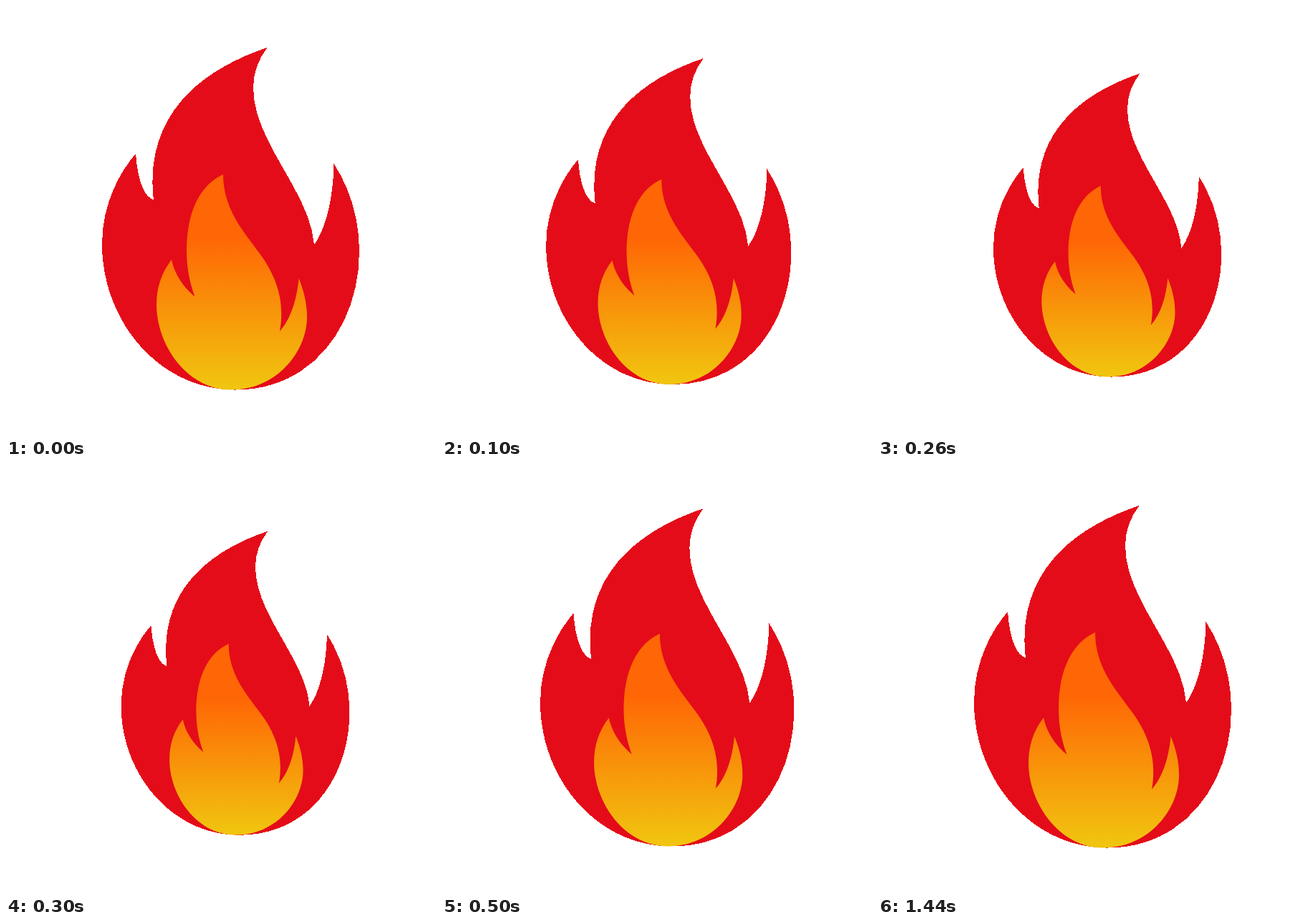
An HTML page that plays this animation: 600x600 px, repeating every 2000 ms.

```html
<!DOCTYPE html>
<html lang="en">
<head>
<meta charset="utf-8">
<title>Flame</title>
<style>
  html, body { margin: 0; width: 100%; height: 100%; overflow: hidden; background: #fff; }
  svg { display: block; width: 100%; height: 100%; }
</style>
</head>
<body>
<svg viewBox="0 0 600 600">
  <defs>
    <linearGradient id="glow" gradientUnits="userSpaceOnUse" x1="0" y1="322" x2="0" y2="530">
      <stop offset="0" stop-color="#ff6605"/>
      <stop offset="1" stop-color="#f1c40f"/>
    </linearGradient>
  </defs>
  <g id="flame">
    <path fill="#e40c19" shape-rendering="crispEdges" d="M364.5 58
      C275 88 192 150 206 270.5 C191 266 183 237 181 206
      C152 240 134 285 134 332 C134 440 214 535 318 535.5
      C428 537 493 445 493 342 C493 300 482 258 457.5 220
      C457 262 448 308 430 333 C424 258 345 190 345 114
      C345 93 352 75 364.5 58Z"/>
    <path fill="url(#glow)" d="M303 235
      C268 251 252 292 252 341 C252 364 256 386 263.5 405.5
      C246 391 235 373 231 354 C217 372 210 393 210 417
      C210 470 250 535 314 535.5 C378 535.5 420 482 420 434
      C420 416 416 398 408.5 380 C406 408 398 436 382 454
      C388 420 383 384 353 344 C331 314 303 283 303 235Z"/>
  </g>
</svg>
<script>
  const LOOP = 2000, STEP = 100;
  const PIVOT = { x: 371.5, y: 377 };
  // One pulse in hard steps, then rest at full size.
  const SCALES = [1, 0.953, 0.8865, 0.888, 0.937, 0.987, 1];
  const flame = document.getElementById('flame');

  function draw(ms) {
    const step = Math.min(Math.floor((ms % LOOP) / STEP), SCALES.length - 1);
    const s = SCALES[step];
    const { x, y } = PIVOT;
    flame.setAttribute('transform', `translate(${x} ${y}) scale(${s}) translate(${-x} ${-y})`);
  }

  function tick() {
    draw(performance.now());
    requestAnimationFrame(tick);
  }
  tick();
</script>
</body>
</html>
```
